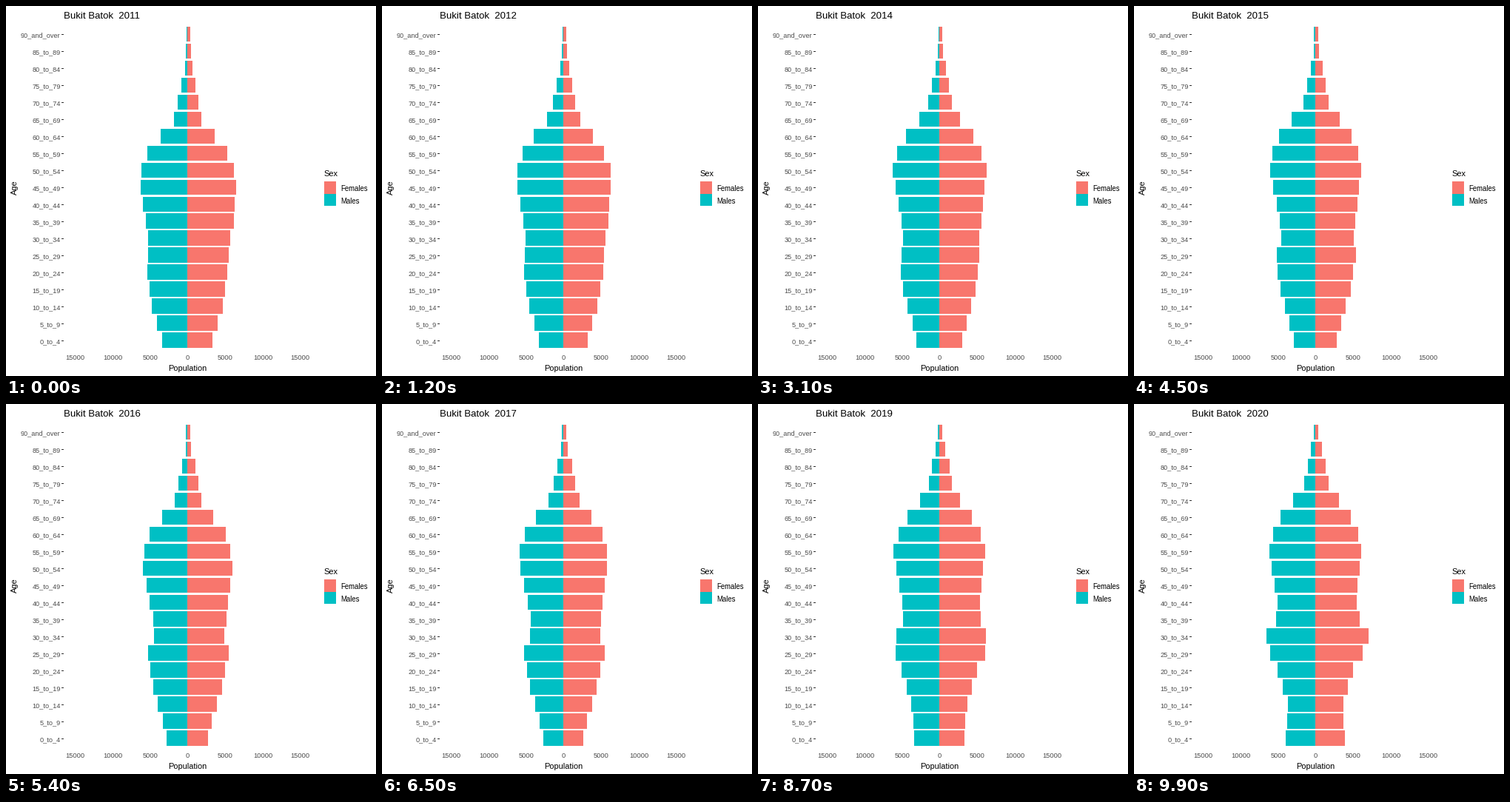
Recreate the animation shown at these times as a matplotlib script. Size 500x500 px, loop 10000 ms.

```python
import matplotlib.pyplot as plt
import numpy as np
from matplotlib.animation import FuncAnimation
from matplotlib.patches import Rectangle

SIZE, DPI = 500, 100
FRAMES, INTERVAL = 100, 100
FIRST_YEAR, STEPS_PER_YEAR, YEARS_PER_ROW = 2011, 11, 5
FEMALE, MALE = "#F8766D", "#00BFC4"
GREY, TICK = "#4D4D4D", "#333333"
ORIGIN, CENTRE = 245, 245.5
ROW_0, ROW_STEP, HALF_BAR = 451.69, 22.98, 10.34
PX_PER_5000 = 50.76

AGES = [f"{a}_to_{a + 4}" for a in range(0, 90, 5)] + ["90_and_over"]
ROWS = np.arange(len(AGES))

# Each cohort keeps its shape and climbs one row every five years.
# Cohorts are numbered by their row in the first year; lengths in pixels.
COHORTS = [-1.8, 0, 2, 4, 5, 6, 9.5, 11, 13, 16, 18]
START = [24, 34, 48, 54, 53, 53, 65, 54.5, 18, 3, 1]
MIDDLE = [24, 33, 46, 53.5, 43, 44.5, 61, 51, 17, 2, 1]
END = [40, 36, 48.5, 69, 54, 50.5, 63.5, 50, 16, 2, 1]
PHASES = [0, 65, FRAMES - 1]

# Surplus of females over males by age row.
SURPLUS = np.interp(ROWS, [0, 4, 6, 7, 9, 11, 13, 16, 18],
                    [0, 0.5, 5.5, 6.5, 2.5, 0, 1, 4, 2.5])


def male_lengths(step):
    sizes = [np.interp(step, PHASES, s) for s in zip(START, MIDDLE, END)]
    climbed = step / STEPS_PER_YEAR / YEARS_PER_ROW
    return np.interp(ROWS - climbed, COHORTS, sizes)


plt.rcParams["font.family"] = "Liberation Sans"
fig = plt.figure(figsize=(SIZE / DPI, SIZE / DPI), dpi=DPI, facecolor="white")
ax = fig.add_axes([0, 0, 1, 1])
ax.set_xlim(0, SIZE)
ax.set_ylim(SIZE, 0)
ax.axis("off")


def label(x, y, text, px, color="black", **kw):
    return ax.text(x, y, text, fontsize=px * 72 / DPI, color=color,
                   va="baseline", **kw)


def box(x, y, w, h, color):
    return ax.add_patch(Rectangle((x, y), w, h, fc=color, lw=0,
                                  antialiased=False))


title = label(78, 17, "", 13.3)
label(CENTRE, 493, "Population", 11, ha="center")
label(15, 245, "Age", 11, ha="center", rotation=90, rotation_mode="anchor")

for n in range(-3, 4):
    label(CENTRE + n * PX_PER_5000, 478.5, str(abs(n) * 5000), 9.3, GREY,
          ha="center")

label(429.7, 230, "Sex", 11)
for top, bottom, color, name in [(237, 254, FEMALE, "Females"),
                                 (254, 270, MALE, "Males")]:
    box(430, top, 16, bottom - top, color)
    label(452.5, top + 13, name, 9.6)

male_bars, female_bars = [], []
for row, age in enumerate(AGES):
    mid = ROW_0 - row * ROW_STEP
    top, bottom = round(mid - HALF_BAR), round(mid + HALF_BAR)
    male_bars.append(box(ORIGIN, top, 0, bottom - top, MALE))
    female_bars.append(box(ORIGIN, top, 0, bottom - top, FEMALE))
    box(75, round(mid), 3, 1, TICK)
    label(73.7, mid + 4.3, age, 9.2, GREY, ha="right")


def update(step):
    title.set_text(f"Bukit Batok  {round(FIRST_YEAR + step / STEPS_PER_YEAR)}")
    males = male_lengths(step)
    for bar, w in zip(male_bars, np.rint(males)):
        bar.set_x(ORIGIN - w)
        bar.set_width(w)
    for bar, w in zip(female_bars, np.rint(males + SURPLUS)):
        bar.set_width(w)
    return [title, *male_bars, *female_bars]


anim = FuncAnimation(fig, update, frames=FRAMES, interval=INTERVAL,
                     repeat=True, repeat_delay=0)
plt.show()
```
